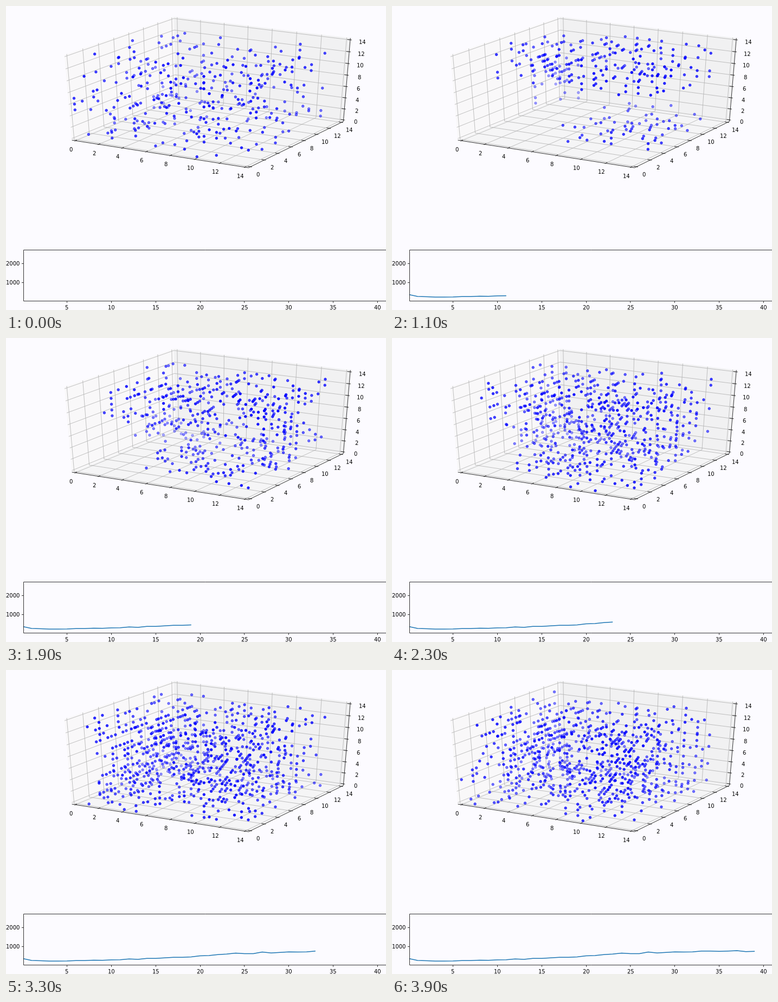
An HTML page with a canvas for the animation above (4 s loop, 701 by 560 pixels).

```html
<!DOCTYPE html>
<html>
<head>
<meta charset="utf-8">
<style>
html, body { margin: 0; width: 100%; height: 100%; overflow: hidden; background: #fcfbff; }
canvas { display: block; }
</style>
</head>
<body>
<canvas id="stage" width="701" height="560"></canvas>
<script>
const ctx = document.getElementById('stage').getContext('2d');
const N = 14, STEPS = 40, STEP_MS = 100;
const LO = -N / 48, HI = N - LO;
const EVEN = [0, 2, 4, 6, 8, 10, 12, 14];
const counts = [350, 250, 230, 212, 212, 216, 240, 240, 260, 253, 275, 285, 325, 310, 355, 360,
  387, 414, 416, 436, 495, 513, 565, 590, 642, 610, 612, 700, 652, 680, 706, 700, 711, 755, 755,
  738, 750, 770, 722, 736];

// Perspective view at azimuth -60, elevation 30, distance 10.
function project(x, y, z) {
  x = x / N - .5; y = y / N - .5; z = z / N - .5;
  const depth = 10 - (.433 * x - .75 * y + .5 * z);
  return [376 + 3610 * (.866 * x + .5 * y) / depth,
          154 - 1721 * (-.25 * x + .433 * y + .866 * z) / depth, depth];
}

function path(...points) {
  ctx.beginPath();
  points.forEach(p => ctx.lineTo(p[0], p[1]));
}
function line3(...points) {
  path(...points.map(p => project(...p)));
  ctx.stroke();
}
function pane(color, ...points) {
  path(...points.map(p => project(...p)));
  ctx.fillStyle = color;
  ctx.fill();
}
// Text starts on whole pixels; anchor is the fraction of its width left of x.
function label(text, x, y, anchor = .5) {
  ctx.fillStyle = '#000';
  ctx.fillText(text, Math.round(x - anchor * ctx.measureText(text).width), Math.round(y + 3.7));
}

function drawBox() {
  pane('#f9f8f9', [LO, LO, LO], [LO, HI, LO], [LO, HI, HI], [LO, LO, HI]);
  pane('#f1f1f2', [LO, HI, LO], [HI, HI, LO], [HI, HI, HI], [LO, HI, HI]);
  pane('#f5f5f6', [LO, LO, LO], [HI, LO, LO], [HI, HI, LO], [LO, HI, LO]);
  ctx.lineWidth = .8;
  ctx.strokeStyle = '#b0b0b0';
  for (const v of EVEN) {
    line3([v, LO, LO], [v, HI, LO], [v, HI, HI]);
    line3([HI, v, LO], [LO, v, LO], [LO, v, HI]);
    line3([LO, LO, v], [LO, HI, v], [HI, HI, v]);
  }
  ctx.strokeStyle = '#000';
  line3([LO, LO, LO], [HI, LO, LO], [HI, HI, LO], [HI, HI, HI]);
  const out = .117, inn = .233;
  for (const v of EVEN) {
    line3([v, LO - out, LO], [v, LO + inn, LO]);
    line3([HI + out, v, LO], [HI - inn, v, LO]);
    line3([HI + out, HI, v], [HI - inn, HI, v]);
    const [a, b, c] = [[v, LO, LO], [HI, v, LO], [HI, HI, v]].map(p => project(...p));
    label(v, a[0] - 8, a[1] + 16);
    label(v, b[0] + 14.5, b[1] + 14);
    label(v, c[0] + 22.5, c[1] + 3.7);
  }
}

function hash(x, y, z, t) {
  let h = Math.imul(x + 1, 73856093) ^ Math.imul(y + 1, 19349663)
        ^ Math.imul(z + 1, 83492791) ^ Math.imul(t + 1, 265443577);
  h = Math.imul(h ^ h >>> 15, 0x2c1b3c6d);
  h = Math.imul(h ^ h >>> 12, 0x297a2d39);
  return ((h ^ h >>> 15) >>> 0) / 4294967296;
}

const gap = (...d) => Math.hypot(...d.map(v => Math.max(0, v)));

// Living cells shrink to a few colonies, which then spread through the cube.
function cells(t) {
  const reach = 24 * Math.exp(-1.1 * t) + .27 * Math.max(0, t - 7);
  const list = [];
  for (let x = 0; x < N; x++) for (let y = 0; y < N; y++) for (let z = 0; z < N; z++) {
    const top = gap(9 - z, 2 * (5 - y));
    const bottom = gap(z - 1, 7 - x, 4 - y, y - 12);
    const corner = gap(x - 1, 11 - y, 2 - z);
    const away = Math.max(0, Math.min(top, bottom, corner) - reach);
    const clump = t ? .12 * Math.sin(x * .9 + t) * Math.sin(y * .8 - t * .6) * Math.cos(z * .9 + t * .3) : 0;
    list.push({ score: hash(x, y, z, t) + clump + .6 * away, p: project(x, y, z) });
  }
  return list.sort((a, b) => a.score - b.score).slice(0, counts[t])
    .map(c => c.p).sort((a, b) => b[2] - a[2]);
}

function drawCells(t) {
  const dots = cells(t), far = dots[0][2], near = dots[dots.length - 1][2];
  ctx.lineWidth = 1;
  for (const [x, y, depth] of dots) {
    ctx.fillStyle = ctx.strokeStyle = `rgba(0,0,255,${.3 + .7 * (far - depth) / (far - near)})`;
    ctx.beginPath();
    ctx.arc(x, y, 2.236, 0, 7);
    ctx.fill();
    ctx.stroke();
  }
}

function drawChart(t) {
  const px = v => 30.7 + v * 16.37, py = v => 543.5 - v * .03426;
  ctx.save();
  ctx.beginPath();
  ctx.rect(32, 449, 669, 95);
  ctx.clip();
  ctx.strokeStyle = '#1f77b4';
  ctx.lineWidth = 1.5;
  ctx.lineJoin = 'round';
  path(...counts.slice(0, t + 1).map((n, i) => [px(i), py(n)]));
  if (t) ctx.stroke();
  ctx.restore();
  ctx.strokeStyle = '#000';
  ctx.lineWidth = .8;
  path([710, 449.5], [32.5, 449.5], [32.5, 543.5], [710, 543.5]);
  ctx.stroke();
  for (let v = 5; v <= 40; v += 5) {
    const x = Math.floor(px(v)) + .5;
    path([x, 544], [x, 547]);
    ctx.stroke();
    label(v, px(v), 555.3);
  }
  for (const v of [1000, 2000]) {
    const y = Math.floor(py(v)) + .5;
    path([29, y], [32, y]);
    ctx.stroke();
    label(v, 25.5, y, 1);
  }
}

let shown = -1;
function tick() {
  const t = Math.floor(performance.now() / STEP_MS) % STEPS;
  if (t !== shown) {
    shown = t;
    ctx.fillStyle = '#fcfbff';
    ctx.fillRect(0, 0, 701, 560);
    ctx.font = '10px "DejaVu Sans", sans-serif';
    drawBox();
    drawCells(t);
    drawChart(t);
  }
  requestAnimationFrame(tick);
}
tick();
</script>
</body>
</html>
```
